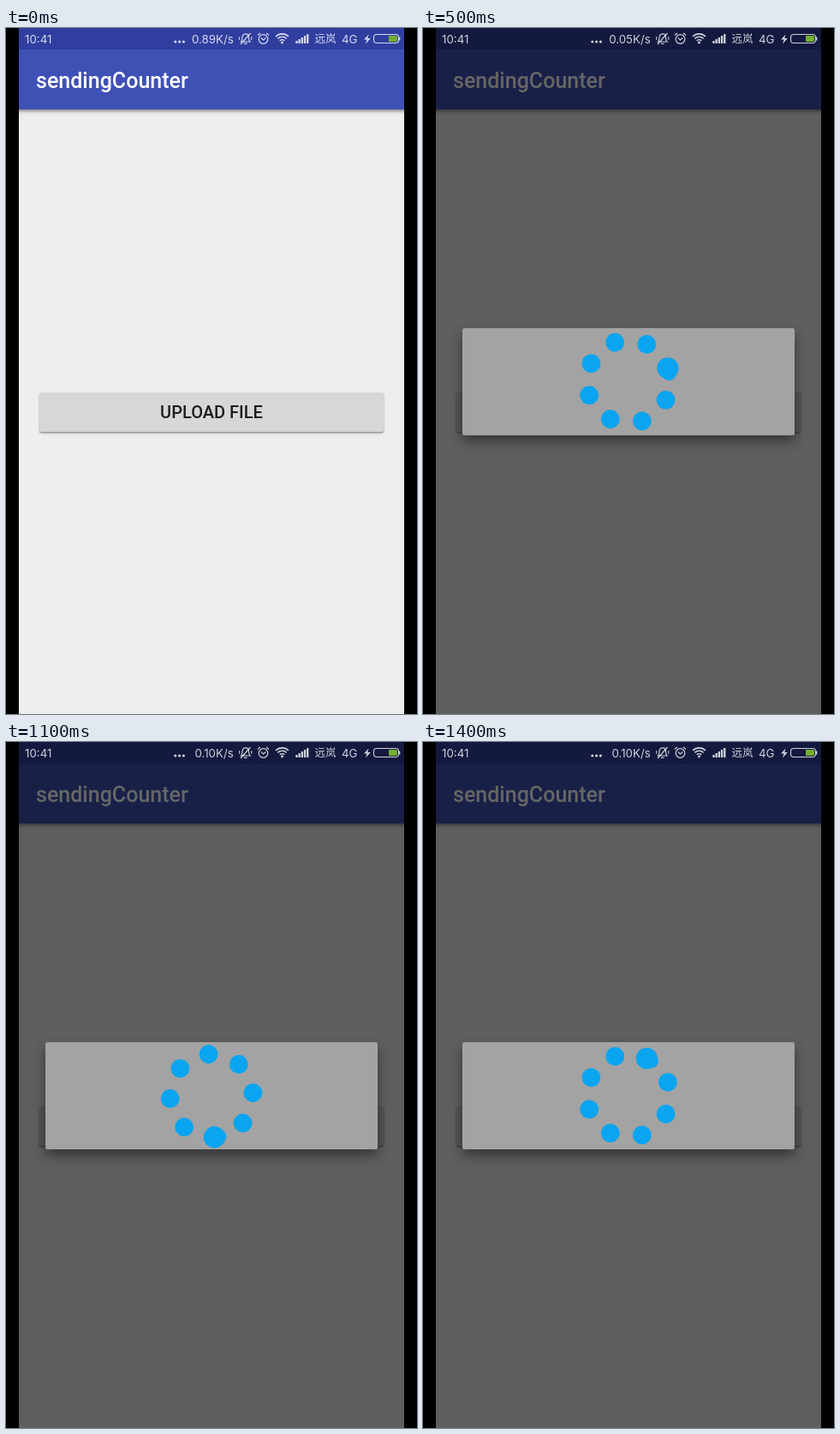
Animation of 480x800 px, one loop 1.5 s. Source, as an HTML page with a canvas:

```html
<!DOCTYPE html>
<html lang="en">
<head>
<meta charset="utf-8">
<title>Upload</title>
<style>
html, body { margin: 0; width: 100%; height: 100%; overflow: hidden; background: #000; }
canvas { display: block; }
</style>
</head>
<body>
<canvas id="stage" width="480" height="800"></canvas>
<script>
const ctx = document.getElementById('stage').getContext('2d');
const LOOP = 1500, STEP = 100;
const RAD = Math.PI / 180;
const CENTER = { x: 240, y: 412.5 };
const ORBIT = 48.5, DOT = 10.8, RUNNER = 8, REACH = 18;
const BLUE = '#0aa5f0', LIGHT = 'rgba(255,255,255,.8)';

function rect(x, y, w, h, color) {
  ctx.fillStyle = color;
  ctx.fillRect(x, y, w, h);
}

function roundRect(x, y, w, h, r, color) {
  ctx.fillStyle = color;
  ctx.beginPath();
  ctx.roundRect(x, y, w, h, r);
  ctx.fill();
}

function disc(x, y, r, color) {
  ctx.fillStyle = color;
  ctx.beginPath();
  ctx.arc(x, y, r, 0, 2 * Math.PI);
  ctx.fill();
}

function line(points, width = 1.2) {
  ctx.lineWidth = width;
  ctx.beginPath();
  points.forEach(([x, y]) => ctx.lineTo(x, y));
  ctx.stroke();
}

function arc(x, y, r, from = 0, to = 360, width = 1.2) {
  ctx.lineWidth = width;
  ctx.beginPath();
  ctx.arc(x, y, r, from * RAD, to * RAD);
  ctx.stroke();
}

function text(str, x, y, font, color, align = 'left') {
  ctx.font = font;
  ctx.fillStyle = color;
  ctx.textAlign = align;
  ctx.fillText(str, x, y);
}

function shadow(color, blur, dy) {
  ctx.shadowColor = color;
  ctx.shadowBlur = blur;
  ctx.shadowOffsetY = dy;
}

function drawPage() {
  rect(0, 0, 480, 800, '#000');
  rect(15, 0, 450, 800, '#eee');
  ctx.save();
  ctx.beginPath();
  ctx.rect(15, 0, 450, 800);
  ctx.clip();
  shadow('rgba(0,0,0,.45)', 4, 1.5);
  rect(10, 25, 460, 70, '#3f51b5');
  ctx.restore();
  rect(15, 0, 450, 25, '#303f9f');
  text('sendingCounter', 35, 70, '500 25px Roboto, sans-serif', '#fff');

  ctx.save();
  shadow('rgba(0,0,0,.4)', 2, 1.5);
  roundRect(39, 425, 402, 46, 2.5, '#d6d7d7');
  ctx.restore();
  text('UPLOAD FILE', 240, 455, '500 20px Roboto, sans-serif', '#1c1d20', 'center');
}

function drawBell() {
  ctx.lineWidth = 1.2;
  ctx.beginPath();
  ctx.moveTo(274.5, 16);
  ctx.quadraticCurveTo(276, 14.5, 276, 11);
  ctx.bezierCurveTo(276, 5.5, 283.5, 5.5, 283.5, 11);
  ctx.quadraticCurveTo(283.5, 14.5, 285, 16);
  ctx.closePath();
  ctx.stroke();
  line([[278, 18.3], [281.5, 18.3]]);
  line([[285.5, 6], [274, 19]]);
  line([[272.7, 10], [272.7, 14]], 1);
  line([[286.8, 10], [286.8, 14]], 1);
}

function drawAlarm() {
  arc(300.5, 13, 5.3);
  line([[297.8, 11.5], [300.5, 14], [303.3, 11.5]], 1.1);
  line([[294, 8.5], [297, 6]]);
  line([[307, 8.5], [304, 6]]);
}

function drawBattery() {
  ctx.lineWidth = 1.1;
  ctx.beginPath();
  ctx.roundRect(429.5, 7.5, 29, 10, 3.5);
  ctx.stroke();
  rect(459, 10.5, 1.3, 4, LIGHT);
  roundRect(447, 9, 10, 7, [0, 2, 2, 0], '#72b02c');
  ctx.fillStyle = LIGHT;
  ctx.beginPath();
  [[423.5, 7.5], [418, 13.5], [421.5, 13.5], [420, 18.5], [425.8, 12], [422.3, 12]]
    .forEach(([x, y]) => ctx.lineTo(x, y));
  ctx.fill();
}

function drawStatus(speed) {
  const font = '13.3px Inter, sans-serif';
  ctx.strokeStyle = LIGHT;
  text('10:41', 22, 17.5, font, LIGHT);
  [197.8, 202.6, 207.4].forEach(x => disc(x, 16, 1.6, LIGHT));
  text(speed, 265.7, 17.5, font, LIGHT, 'right');
  drawBell();
  drawAlarm();
  [3.8, 7.2, 10.6].forEach(r => arc(322.5, 17.5, r, 225, 315, 1.6));
  disc(322.5, 17, 1.4, LIGHT);
  for (let i = 0; i < 5; i++) {
    const h = 3 + i * 2;
    rect(338.3 + i * 3.2, 18 - h, 2.3, h, LIGHT);
  }
  text('远岚', 360.5, 17.3, '12.5px "Noto Sans CJK SC", "Noto Sans CJK", sans-serif', LIGHT);
  text('4G', 392, 17.5, font, LIGHT);
  drawBattery();
}

function onRing(degrees) {
  return {
    x: CENTER.x + ORBIT * Math.cos(degrees * RAD),
    y: CENTER.y + ORBIT * Math.sin(degrees * RAD)
  };
}

// Fills the notches where the runner's disc crosses a ring dot.
function drawBridge(a, ra, b, rb) {
  const d = Math.hypot(b.x - a.x, b.y - a.y);
  if (d <= ra - rb + 1 || d >= ra + rb) return;
  const axis = Math.atan2(b.y - a.y, b.x - a.x);
  const cross = Math.acos((ra * ra + d * d - rb * rb) / (2 * ra * d));
  const crossB = Math.acos((rb * rb + d * d - ra * ra) / (2 * rb * d));
  const tangent = Math.acos((ra - rb) / d);
  const angleA = (cross + tangent) / 2;
  const angleB = (Math.PI - crossB + tangent) / 2;
  const at = (p, r, angle) => [p.x + r * Math.cos(axis + angle), p.y + r * Math.sin(axis + angle)];
  ctx.beginPath();
  ctx.moveTo(...at(a, ra, angleA));
  ctx.quadraticCurveTo(...at(a, ra, cross), ...at(b, rb, angleB));
  ctx.lineTo(...at(b, rb, -angleB));
  ctx.quadraticCurveTo(...at(a, ra, -cross), ...at(a, ra, -angleA));
  ctx.fill();
}

function drawSpinner(t) {
  const spin = 16 + 0.25 * (t - STEP);
  const runner = onRing(48.8 + 0.75 * (t - STEP));
  for (let i = 0; i < 8; i++) {
    const dot = onRing(spin + 45 * i);
    const gap = Math.hypot(dot.x - runner.x, dot.y - runner.y);
    const near = Math.max(0, 1 - gap / REACH);
    const r = DOT * (1 + 0.25 * near);
    disc(dot.x, dot.y, r, BLUE);
    if (near) drawBridge(dot, r, runner, RUNNER);
  }
  disc(runner.x, runner.y, RUNNER, BLUE);
}

function drawDialog(t) {
  rect(15, 0, 450, 800, 'rgba(0,0,0,.6)');
  ctx.save();
  shadow('rgba(0,0,0,.45)', 15, 7);
  roundRect(46, 350, 388, 125, 2.5, '#a3a3a3');
  ctx.restore();
  drawSpinner(t);
}

function render(now) {
  const t = Math.floor((now % LOOP) / STEP) * STEP;
  drawPage();
  if (t >= STEP) drawDialog(t);
  drawStatus(t < STEP ? '0.89K/s' : t < 600 ? '0.05K/s' : '0.10K/s');
}

let start = null;
function tick(now) {
  if (start === null) start = now;
  render(now - start);
  requestAnimationFrame(tick);
}
render(0);
requestAnimationFrame(tick);
</script>
</body>
</html>
```
